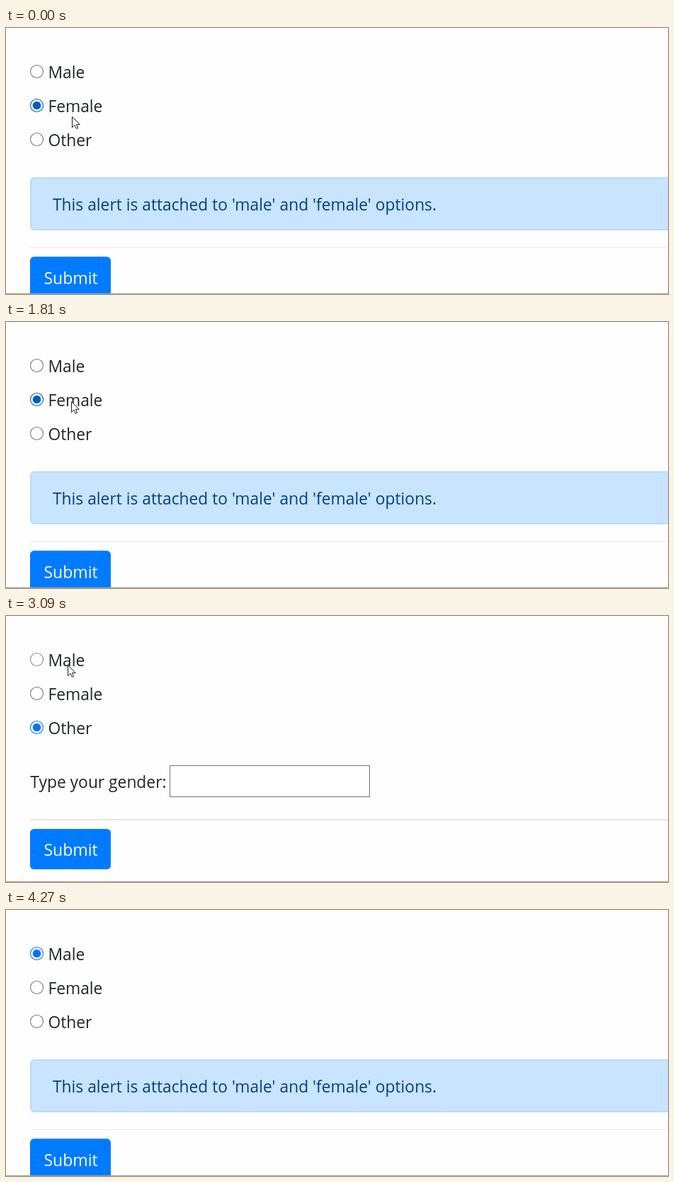
Recreate the animation shown at these times as an HTML page. Size 935 px wide and 376 px high, loop 4670 ms.

```html
<!DOCTYPE html>
<html lang="en">
<head>
<meta charset="utf-8">
<title>Conditional form</title>
<style>
  html, body { margin: 0; width: 100%; height: 100%; overflow: hidden; background: #fefefe; }
  svg { display: block; width: 935px; height: 376px; }
  text { font: 22.8px "Open Sans", "Noto Sans", sans-serif; fill: #212529; }
  .ring { fill: #fff; stroke-width: 1.1; }
  #alert rect { fill: #c9e4fe; stroke: #b8daff; stroke-width: 2; }
  #alert text { fill: #004085; }
  #submit text { font-size: 23px; fill: #fff; }
  #bottom { fill: #a0a0a0; }
</style>
</head>
<body>
<svg viewBox="0 0 935 376">
  <g id="radios"></g>
  <g id="alert">
    <rect x="35" y="212" width="960" height="73" rx="5"/>
    <text x="66" y="258.4">This alert is attached to 'male' and 'female' options.</text>
    <rect x="34" y="310" width="901" height="1" style="fill:#e9e9e9;stroke:none"/>
  </g>
  <g id="other">
    <text x="34.3" y="243.3">Type your gender:</text>
    <rect x="231.5" y="211.5" width="282" height="44" fill="#fff" stroke="#767676"/>
    <rect x="34" y="287" width="901" height="2" fill="#e5e5ea"/>
  </g>
  <g id="submit">
    <rect x="34" width="114" height="57" rx="5.5"/>
    <text x="53.5" y="38.4">Submit</text>
  </g>
  <rect id="bottom" y="375" width="935" height="1"/>
  <path id="cursor" d="M.5 .5V15.5L4 12.2L6.3 17.3L8.6 16.3L6.4 11.4H11.2Z" fill="#fff" stroke="#1c1c24"/>
</svg>
<script>
const LOOP = 4670, SAMPLE = 52, POINTER_GONE = 4270;
const MALE = 0, FEMALE = 1, OTHER = 2;
const $ = id => document.getElementById(id);

const smooth = p => p * p * (3 - 2 * p);
const easeOut = p => 1 - (1 - p) ** 3;

const home = { x: 93, y: 125 };
const glides = [
  { from: 50, to: 310, x: 92, y: 152, ease: smooth },
  { from: 1420, to: 1520, x: 92, y: 112, ease: easeOut },
  { from: 1930, to: 2190, x: 90, y: 164, ease: smooth },
  { from: 2610, to: 2820, x: 87, y: 69, ease: smooth },
  { from: 3270, to: 3490, x: 95, y: 340, ease: smooth },
  { from: 3540, to: 4040, x: 584, y: 97, ease: smooth }
];
const clicks = [
  { option: OTHER, press: 490, release: 610 },
  { option: FEMALE, press: 1690, release: 1810 },
  { option: OTHER, press: 2290, release: 2440 },
  { option: MALE, press: 3090, release: 3210 }
];

// The pointer advances in whole samples, the first one at the start of a glide.
function pointerAt(t) {
  if (t >= POINTER_GONE) return null;
  let { x, y } = home;
  for (const g of glides.filter(g => t >= g.from)) {
    const gaps = Math.round((g.to - g.from) / SAMPLE);
    const sample = Math.floor((t - g.from) / (g.to - g.from) * gaps + .001) + 1;
    const p = g.ease(Math.min(1, sample / (gaps + 1)));
    x += (g.x - x) * p;
    y += (g.y - y) * p;
  }
  return { x: Math.round(x), y: Math.round(y) };
}

function add(parent, tag, attrs) {
  const node = document.createElementNS('http://www.w3.org/2000/svg', tag);
  for (const name in attrs) node.setAttribute(name, attrs[name]);
  return parent.appendChild(node);
}

const radios = ['Male', 'Female', 'Other'].map((label, i) => {
  const y = 61.5 + 48 * i;
  const ring = add($('radios'), 'circle', { class: 'ring', cx: 43.5, cy: y, r: 9 });
  const dot = add($('radios'), 'circle', { cx: 43.5, cy: y, r: 5.8 });
  add($('radios'), 'text', { x: 59.4, y: y + 9.5 }).textContent = label;
  return { y, ring, dot };
});

const inside = (p, x0, x1, y0, y1) => p && p.x >= x0 && p.x <= x1 && p.y >= y0 && p.y <= y1;
const show = (node, on) => node.style.display = on ? '' : 'none';

// Colours by state: idle, hovered, pressed.
const accent = ['#0075ff', '#005cc8', '#3793ff'];
const outline = ['#767676', '#4f4f4f', '#8d8d8d'];

function render(t) {
  const pointer = pointerAt(t);
  const checked = clicks.findLast(c => t >= c.release)?.option ?? FEMALE;
  const pressed = clicks.find(c => t >= c.press && t < c.release)?.option;

  radios.forEach(({ y, ring, dot }, i) => {
    const on = i === checked;
    const state = i === pressed ? 2 : inside(pointer, 34, 135, y - 15, y + 17) ? 1 : 0;
    ring.setAttribute('stroke', (on ? accent : outline)[state]);
    dot.setAttribute('fill', accent[state]);
    show(dot, on);
  });

  const isOther = checked === OTHER;
  const top = isOther ? 301 : 323.3;
  show($('other'), isOther);
  show($('alert'), !isOther);
  $('submit').setAttribute('transform', `translate(0 ${top})`);
  $('submit').firstElementChild.setAttribute('fill',
    inside(pointer, 34, 148, top, top + 57) ? '#0069d9' : '#007bff');

  show($('cursor'), pointer);
  if (pointer) $('cursor').setAttribute('transform', `translate(${pointer.x} ${pointer.y})`);
}

const start = performance.now();
function tick() {
  render((performance.now() - start) % LOOP);
  requestAnimationFrame(tick);
}
tick();
</script>
</body>
</html>
```
